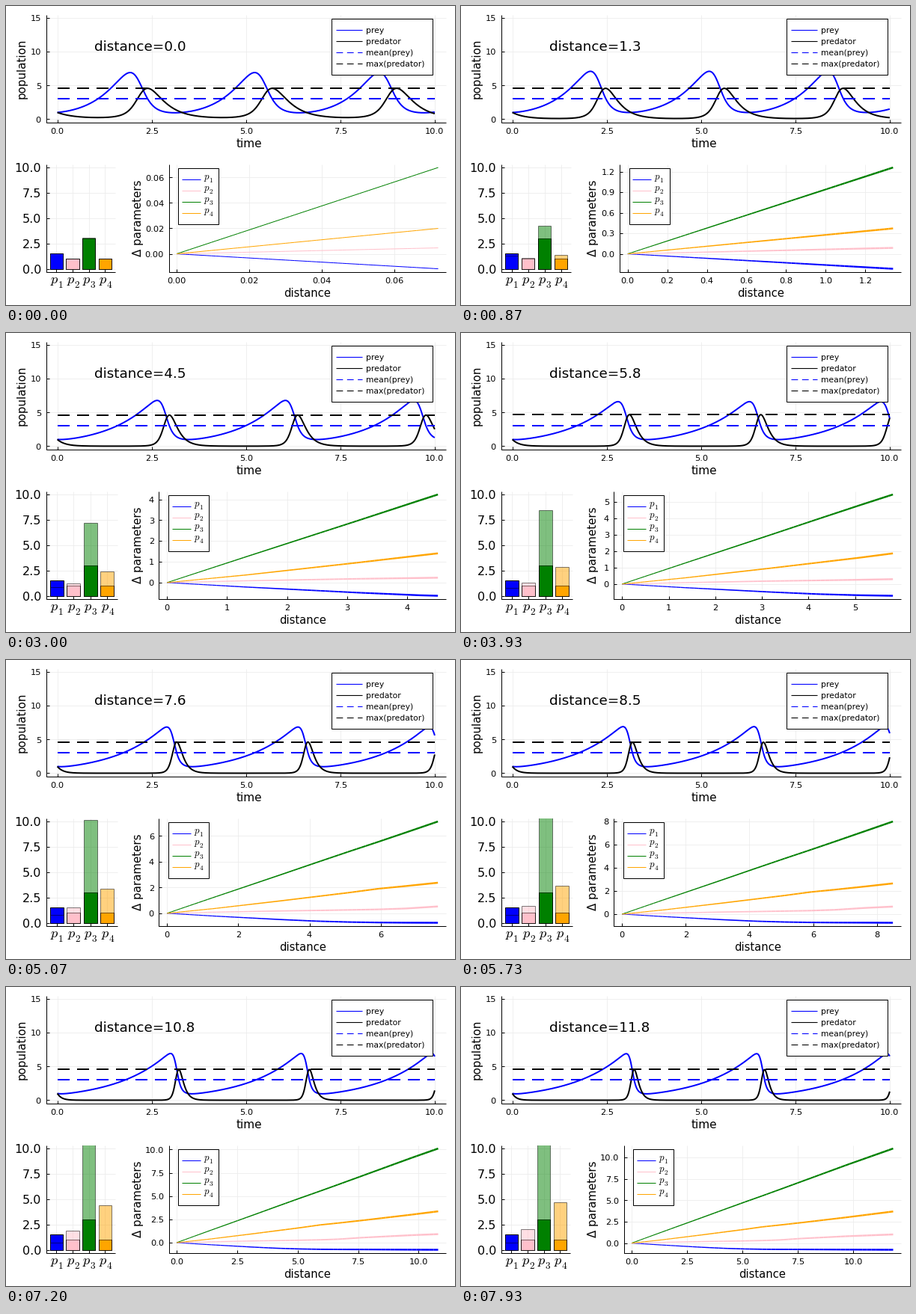
A matplotlib script that plays this animation: 600x400 px, repeating every 8000 ms.

```python
import math
import numpy as np
import matplotlib.pyplot as plt
from matplotlib.animation import FuncAnimation
from matplotlib.collections import LineCollection
from matplotlib.patches import Rectangle

plt.rcParams["font.family"] = "DejaVu Sans"
plt.rcParams["mathtext.fontset"] = "cm"

FRAMES, LOOP = 120, 8000
PX = 0.72  # points per pixel at 100 dpi
COLORS = ["blue", "pink", "green", "orange"]
GRID = "#ececec"
DASH = (0, (8, 5))
BASE = np.array([1.5, 1.0, 3.0, 1.0])

# parameter change along the curve, by distance
KNOTS = [0, 1.32, 3.15, 4.2, 5.1, 5.92, 6.7, 7.61, 9.69, 12]
DELTA = [
    [0, -.215, -.48, -.61, -.68, -.716, -.73, -.736, -.758, -.778],
    [0, .086, .18, .22, .26, .30, .37, .53, .80, 1.03],
    [0, 1.243, 2.95, 3.94, 4.78, 5.53, 6.26, 7.12, 9.09, 11.2],
    [0, .366, .95, 1.30, 1.60, 1.90, 2.11, 2.37, 3.0, 3.75],
]


def reach(k):
    return 0.1 * k + 0.005 + 0.067 * math.exp(-k / 20)


def delta(d):
    return np.array([np.interp(d, KNOTS, row) for row in DELTA])


def simulate(p, n=1000, end=10.0):
    """Lotka-Volterra for all parameter sets at once, by RK4."""
    a, b, c, e = p
    h = end / n

    def rate(u):
        x, y = u
        return np.array([a * x - b * x * y, e * x * y - c * y])

    u = np.ones((2, p.shape[1]))
    out = [u]
    for _ in range(n):
        k1 = rate(u)
        k2 = rate(u + h / 2 * k1)
        k3 = rate(u + h / 2 * k2)
        k4 = rate(u + h * k3)
        u = u + h / 6 * (k1 + 2 * k2 + 2 * k3 + k4)
        out.append(u)
    return np.array(out)


def nice_ticks(lo, hi):
    """Tick values and labels, scored by count, coverage and roundness."""
    span = hi - lo
    best, pick = -1, None
    top = math.floor(math.log10(span))
    for z in (top, top - 1):
        for q, nice in ((1, 1), (5, .9), (2.5, .5), (2, .7), (3, .2)):
            step = q * 10.0 ** z
            first, last = math.ceil(lo / step), math.floor(hi / step)
            n = last - first + 1
            if not 4 <= n <= 9:
                continue
            score = ((1 - abs(n - 5) / 5) / 4 + nice / 4
                     + 0.5 * span / ((n - 1) * step))
            if score > best + 1e-9:
                best = score
                digits = max(0, -z + (q == 2.5))
                pick = [i * step for i in range(first, last + 1)], digits
    values, digits = pick
    return values, [f"{v + 0.0:.{digits}f}" for v in values]


class Panel:
    """Maps data ranges to a pixel box."""

    def __init__(self, box, xlim, ylim):
        self.l, self.t, self.r, self.b = box
        self.xlim, self.ylim = xlim, ylim

    def x(self, v):
        lo, hi = self.xlim
        return self.l + (np.asarray(v) - lo) / (hi - lo) * (self.r - self.l)

    def y(self, v):
        lo, hi = self.ylim
        return self.b - (np.asarray(v) - lo) / (hi - lo) * (self.b - self.t)


fig = plt.figure(figsize=(6, 4), dpi=100, facecolor="white")
ax = fig.add_axes([0, 0, 1, 1])
ax.set_xlim(0, 600)
ax.set_ylim(400, 0)
ax.axis("off")


def line(xs, ys, color="black", w=1.0, z=3, **kw):
    return ax.plot(xs, ys, color=color, lw=w * PX, zorder=z,
                   solid_capstyle="butt", dash_capstyle="butt", **kw)[0]


def label(x, y, s, size, ha="center", va="center_baseline", z=8, **kw):
    return ax.text(x, y, s, fontsize=size * PX, ha=ha, va=va, zorder=z, **kw)


def p_label(x, y, i, size):
    """Italic p with a low-set index, from the left edge x."""
    return [label(x, y, "$p$", size, "left", "baseline"),
            label(x + 0.54 * size, y + 0.3 * size, f"${i}$", 0.72 * size,
                  "left", "baseline")]


def box(x, y, w, h, face, edge="black", z=3, **kw):
    return ax.add_patch(Rectangle((x, y), w, h, fc=face, ec=edge,
                                  lw=PX, zorder=z, **kw))


def frame_axes(p, xticks, yticks):
    parts = []
    for v in p.x(xticks):
        parts += [line([v, v], [p.t, p.b], GRID, 0.8, 1),
                  line([v, v], [p.b, p.b - 4])]
    for v in p.y(yticks):
        parts += [line([p.l, p.r], [v, v], GRID, 0.8, 1),
                  line([p.l, p.l + 4], [v, v])]
    parts.append(line([p.l, p.l, p.r], [p.t, p.b, p.b]))
    return parts


def tick_labels(p, xs, xnames, ys, ynames, ysize=11.4):
    parts = [label(x, p.b + 11.5, s, 11.4) for x, s in zip(p.x(xs), xnames)]
    parts += [label(p.l - 6.5, y + 0.3, s, ysize, "right")
              for y, s in zip(p.y(ys), ynames)]
    return parts


series = [delta(reach(k)) for k in range(FRAMES)]
params = BASE[:, None] + np.array(series).T
orbit = simulate(params)

# population panel
pop = Panel((53.5, 12, 588, 155.5), (-0.3, 10.3), (-0.45, 15.45))
xt, yt = [0, 2.5, 5, 7.5, 10], [0, 5, 10, 15]
frame_axes(pop, xt, yt)
tick_labels(pop, xt, [f"{v:.1f}" for v in xt], yt, yt)
label(324.5, 183, "time", 15.2)
label(21, 83.5, "population", 15, va="center", rotation=90)
box(434.5, 16.5, 135.5, 75, "white", z=6)
names = ["prey", "predator", "mean(prey)", "max(predator)"]
for i, name in enumerate(names):
    y = 31.5 + 15 * i
    line([441, 476], [y, y], "black" if i % 2 else "blue",
         1.1, 7, ls="-" if i < 2 else DASH)
    label(481.5, y + 0.3, name, 10.8, "left")

px = pop.x(np.linspace(0, 10, len(orbit)))
ends = pop.x([0, 10])
prey = line(px, px, "blue", 2)
pred = line(px, px, "black", 2)
mean_line = line(ends, ends, "blue", 2, ls=DASH)
max_line = line(ends, ends, "black", 2, ls=DASH)
title = label(118, 52.5, "", 18.4, "left")

moving = []


def draw_bars(right, p):
    bars = Panel((53.5, 212, right, 355.6), (0.36, 4.62), (-0.3, 10.3))
    ticks = [0, 2.5, 5, 7.5, 10]
    moving.extend(frame_axes(bars, [1, 2, 3, 4], ticks))
    moving.extend(tick_labels(bars, [], [], ticks,
                              [f"{v:.1f}" for v in ticks], 16))
    w = bars.x(0.8) - bars.x(0)
    clip = Rectangle((bars.l, bars.t), right - bars.l, bars.b - bars.t,
                     transform=ax.transData)
    zero = bars.y(0)
    for i, color in enumerate(COLORS):
        left = bars.x(i + 0.6)
        for value, alpha in ((BASE[i], 1), (p[i], 0.5)):
            top = bars.y(value)
            bar = box(left, top, w, zero - top, color, alpha=alpha)
            bar.set_clip_path(clip)
            moving.append(bar)
        moving.extend(p_label(bars.x(i + 1) - 8.5, 371.5, i + 1, 18.5))


def draw_deltas(k):
    d = reach(k)
    xs = np.linspace(0, d, 61)
    ys = delta(xs)
    lo, hi = ys.min(), ys.max()
    pad = 0.03 * (hi - lo)
    xlim, ylim = (-0.03 * d, 1.03 * d), (lo - pad, hi + pad)
    xticks, xnames = nice_ticks(*xlim)
    yticks, ynames = nice_ticks(*ylim)

    # wider tick labels push both lower panels
    widest = max(ynames, key=len)
    extra = 6.7 * (len(widest.replace(".", "")) - 1) + 3 * ("." in widest)
    left = 204.4 + 0.8 * extra

    p = Panel((left, 212, 588, 355.6), xlim, ylim)
    moving.extend(frame_axes(p, xticks, yticks))
    moving.extend(tick_labels(p, xticks, xnames, yticks, ynames))
    moving.append(label((left + 588) / 2, 382.9, "distance", 14.8))

    widths = 1 + 1.5 * min(1, k / 8) * np.linspace(0, 1, 60)
    for row, color in zip(ys, COLORS):
        pts = np.column_stack([p.x(xs), p.y(row)])
        segs = np.stack([pts[:-1], pts[1:]], axis=1)
        curve = LineCollection(segs, colors=color, linewidths=widths * PX,
                               zorder=3, snap=False)
        moving.append(ax.add_collection(curve, autolim=False))

    x0 = left + 12.7
    moving.append(box(x0, 216.5, 54, 75.5, "white", z=6))
    for i, color in enumerate(COLORS):
        y = 231.5 + 15 * i
        moving.append(line([x0 + 4.5, x0 + 29.5], [y, y], color, 1, 7))
        moving.extend(p_label(x0 + 33.5, y + 0.3, i + 1, 13))
    return 149.2 - 0.2 * extra


label(176.5, 284, "Δ parameters", 15, va="center", rotation=90)


def update(k):
    while moving:
        moving.pop().remove()
    x, y = orbit[:, 0, k], orbit[:, 1, k]
    prey.set_ydata(pop.y(x))
    pred.set_ydata(pop.y(y))
    mean_line.set_ydata(pop.y([x.mean()] * 2))
    max_line.set_ydata(pop.y([y.max()] * 2))
    title.set_text(f"distance={k / 10:.1f}")
    draw_bars(draw_deltas(k), params[:, k])
    return []


anim = FuncAnimation(fig, update, frames=FRAMES, interval=LOOP / FRAMES,
                     init_func=lambda: [], repeat=True, repeat_delay=0)
plt.show()
```
